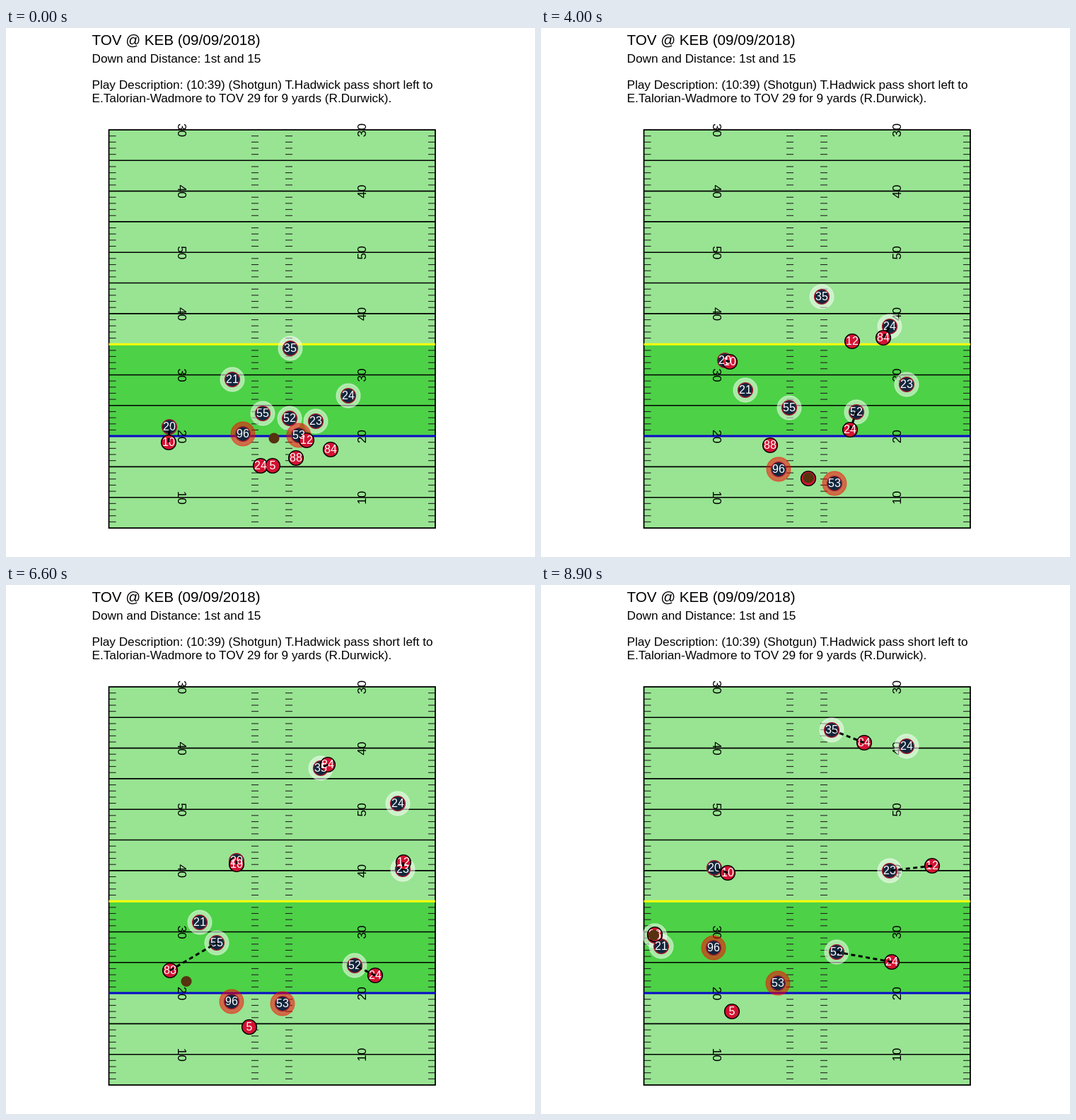
Recreate the animation shown at these times as an HTML page. Size 748 px wide and 748 px high, loop 9 s.

```html
<!DOCTYPE html>
<html lang="en">
<head>
<meta charset="utf-8">
<title>Play animation</title>
<style>
  html, body { margin: 0; width: 100%; height: 100%; overflow: hidden; background: #fff; }
  svg { display: block; width: 100%; height: 100%; font-family: "Liberation Sans", Arial, sans-serif; }
  .mid { text-anchor: middle; }
</style>
</head>
<body>
<svg id="stage" viewBox="0 0 748 748">
  <text x="121.5" y="23.5" font-size="20.6">TOV @ KEB (09/09/2018)</text>
  <g font-size="17.2">
    <text x="121.5" y="49">Down and Distance: 1st and 15</text>
    <text x="121.5" y="86.3">Play Description: (10:39) (Shotgun) T.Hadwick pass short left to</text>
    <text x="121.5" y="105">E.Talorian-Wadmore to TOV 29 for 9 yards (R.Durwick).</text>
  </g>
  <g id="field"></g>
  <g id="halos"></g>
  <g id="defense"></g>
  <g id="offense"></g>
  <g id="numbers" fill="#fff" font-size="16" class="mid"></g>
  <g id="links" stroke="#000" stroke-width="3" stroke-dasharray="6 4.5"></g>
  <circle id="ball" r="7.6" fill="#56320f"/>
</svg>
<script>
const LOOP = 9000, STEP = 100;
const KEY_TIMES = [0, 1800, 4000, 5100, 6600, 7300, 8900];
const FIELD = { left: 145.5, right: 607, top: 144, bottom: 707 };
const YARD = (FIELD.bottom - FIELD.top) / 65;
const byId = id => document.getElementById(id);

function add(parent, tag, attrs, text) {
  const el = document.createElementNS("http://www.w3.org/2000/svg", tag);
  setAttrs(el, attrs);
  if (text !== undefined) el.textContent = text;
  return byId(parent).appendChild(el);
}

function setAttrs(el, attrs) {
  for (const name in attrs) el.setAttribute(name, attrs[name]);
}

function hLine(x1, x2, y, stroke, width) {
  add("field", "line", { x1, x2, y1: y, y2: y, stroke, "stroke-width": width });
}

function drawField() {
  const { left, right, top, bottom } = FIELD;
  const yardY = n => top + n * YARD;
  const box = (y, height, attrs) =>
    add("field", "rect", { x: left, y, width: right - left, height, ...attrs });

  box(top, bottom - top, { fill: "#98e492" });
  box(yardY(35), 15 * YARD, { fill: "#4dd147" });
  for (let n = 1; n < 65; n++) {
    const y = yardY(n);
    if (n % 5 === 0) {
      hLine(left, right, y, "#000", 1.6);
    } else {
      for (const x of [left, 347, 395, right - 10]) hLine(x, x + 10, y, "#222", 1.1);
    }
  }
  box(top, bottom - top, { fill: "none", stroke: "#000", "stroke-width": 1.8 });
  hLine(left, right, yardY(50), "#0808c8", 3);
  hLine(left, right, yardY(35), "#ffff00", 3);
  [30, 40, 50, 40, 30, 20, 10].forEach((label, i) => {
    for (const [x, angle] of [[249, 90], [503, -90]]) {
      add("field", "text", {
        class: "mid", "font-size": 17.2, y: 6.1,
        transform: `translate(${x} ${yardY(i * 10) + 0.6}) rotate(${angle})`
      }, label);
    }
  });
}

// Smooth curve through [time, x, y] knots, starting from rest.
function makePath(points, extra = []) {
  const knots = points.split(" ").map((p, i) => [KEY_TIMES[i], ...p.split(",").map(Number)])
    .concat(extra).sort((a, b) => a[0] - b[0]);
  const last = knots.length - 1;
  const secant = (i, axis) =>
    (knots[i + 1][axis] - knots[i][axis]) / (knots[i + 1][0] - knots[i][0]);

  function slope(i, axis) {
    if (i === 0) return 0;
    if (i === last) return secant(last - 1, axis);
    const before = knots[i][0] - knots[i - 1][0];
    const after = knots[i + 1][0] - knots[i][0];
    return (secant(i - 1, axis) * after + secant(i, axis) * before) / (before + after);
  }

  return t => {
    let i = 0;
    while (i < last - 1 && t >= knots[i + 1][0]) i++;
    const h = knots[i + 1][0] - knots[i][0];
    const u = (t - knots[i][0]) / h;
    const at = axis => {
      const a = knots[i][axis], b = knots[i + 1][axis];
      return a + (b - a) * u * u * (3 - 2 * u)
        + h * u * (1 - u) * (slope(i, axis) * (1 - u) - slope(i + 1, axis) * u);
    };
    return { x: at(1), y: at(2) };
  };
}

const ROLES = {
  zone: { group: "defense", halo: "#fff" },
  rush: { group: "defense", halo: "#f00" },
  man: { group: "defense" },
  route: { group: "offense" },
  passer: { group: "offense" }
};
const players = [];

function player(number, role, points, extra) {
  const { group, halo } = ROLES[role];
  const look = group === "defense"
    ? { fill: "#12263c", stroke: "#a71930" }
    : { fill: "#d31232", stroke: "#000" };
  const p = { role, path: makePath(points, extra), circles: [] };
  if (halo) {
    p.circles.push(add("halos", "circle", {
      r: 17, fill: halo, "fill-opacity": 0.52,
      stroke: halo, "stroke-opacity": 0.4, "stroke-width": 1.3
    }));
  }
  p.circles.push(add(group, "circle", { r: 10.4, "stroke-width": 1.4, ...look }));
  p.label = add("numbers", "text", {}, number);
  players.push(p);
  return p;
}

drawField();

player(35, "zone", "402,453 392,439 397,380 423,342 445,259 444,227 411,205",
  [[1000, 396, 444.5], [3000, 391, 413.5], [8000, 432, 209]]);
player(21, "zone", "320,497 312,502 289,512 298,478 274,477 235,493 170,511");
player(24, "zone", "484,520 491,516 493,422 512,373 554,309 557,279 517,228");
player(55, "zone", "363,545 363,548 351,537 341,517 298,506 259,506 161,496");
player(52, "zone", "401,552 400,561 446,543 487,551 493,538 471,527 418,519");
player(23, "zone", "438,556 444,556 517,504 545,452 561,402 554,400 493,404");
player(96, "rush", "335,574 334,581 336,624 343,613 319,589 304,564 244,513");
player(53, "rush", "414,576 417,583 415,644 416,631 391,592 376,581 335,563");
const cornerback = player(20, "man", "231,564 231,560 260,470 289,416 326,390 308,384 245,400");
const wideout = player(10, "route", "230,586 232,578 267,472 291,422 326,395 320,392 264,407");
player(12, "route", "425,583 426,572 440,443 497,406 562,392 573,388 553,397");
player(84, "route", "459,596 461,581 484,438 469,351 455,254 456,227 457,223");
const catcher = player(88, "route", "410,608 400,607 324,590 278,576 232,545 213,531 161,494");
player(24, "route", "360,619 365,617 437,568 489,558 522,552 517,544 496,533");
const passer = player(5, "passer", "377,619 377,621 378,637 381,615 344,625 319,628 270,603",
  [[3000, 377, 643]]);

const receivers = players.filter(p => p.role === "route");
const zoneDefenders = players.filter(p => p.role === "zone");
const links = receivers.map(() => add("links", "line", {}));

function ballAt(t) {
  const mix = (a, b, u) => ({ x: a.x + (b.x - a.x) * u, y: a.y + (b.y - a.y) * u });
  const held = time => {
    const p = passer.path(time);
    return { x: p.x, y: p.y - 1 };
  };
  const snap = { x: 379, y: 580 }, flight = { x: 255, y: 560.5 };
  if (t < 900) return snap;
  if (t < 1700) return mix(snap, held(1700), (t - 900) / 800);
  if (t < 5900) return held(t);
  if (t < 6600) return mix(held(5900), flight, (t - 5900) / 700);
  if (t < 6750) return mix(flight, catcher.path(6750), (t - 6600) / 150);
  const c = catcher.path(t);
  return { x: c.x - 1.5, y: c.y + 1 };
}

// Each receiver past the line is tied to the nearest zone defender, one receiver per defender.
function findCoverage() {
  const nearest = new Map();
  for (const r of receivers) {
    if (r === wideout || r.pos.y > 570) continue;
    const options = zoneDefenders.map(d => ({
      d, r, gap: Math.hypot(d.pos.x - r.pos.x, d.pos.y - r.pos.y)
    }));
    const best = options.reduce((a, b) => (b.gap < a.gap ? b : a));
    const taken = nearest.get(best.d);
    if (best.gap < 85 && (!taken || best.gap < taken.gap)) nearest.set(best.d, best);
  }
  return [{ d: cornerback, r: wideout }, ...nearest.values()];
}

function draw(t) {
  for (const p of players) {
    p.pos = p.path(t);
    for (const c of p.circles) setAttrs(c, { cx: p.pos.x, cy: p.pos.y });
    setAttrs(p.label, { x: p.pos.x, y: p.pos.y + 5.4 });
  }
  const pairs = findCoverage();
  links.forEach((line, i) => {
    const pair = pairs[i];
    line.style.display = pair ? "" : "none";
    if (pair) {
      const { r, d } = pair;
      setAttrs(line, { x1: r.pos.x, y1: r.pos.y, x2: d.pos.x, y2: d.pos.y });
    }
  });
  const ball = ballAt(t);
  setAttrs(byId("ball"), { cx: ball.x, cy: ball.y });
}

const start = performance.now();
function tick() {
  const elapsed = (performance.now() - start) % LOOP;
  draw(Math.floor(elapsed / STEP) * STEP);
  requestAnimationFrame(tick);
}
tick();
</script>
</body>
</html>
```
